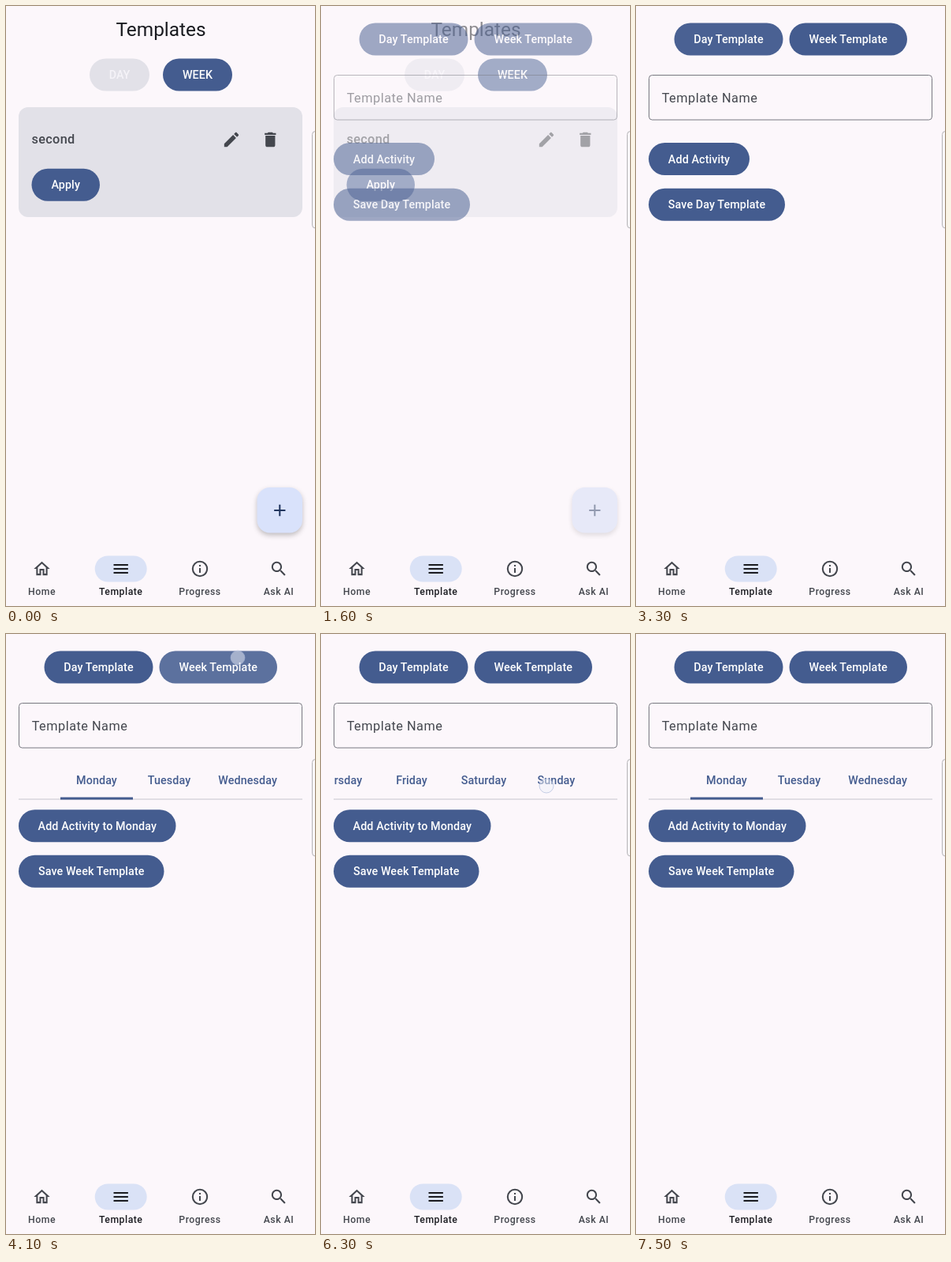
Write an HTML page that moves like this. It is 392 px wide and 759 px high and loops after 8000 ms.

```html
<!DOCTYPE html>
<html lang="en">
<head>
<meta charset="utf-8">
<title>Templates</title>
<style>
  html, body { margin: 0; width: 100%; height: 100%; overflow: hidden; background: #fcf7fb; }
  svg { display: block; width: 100%; height: 100%; }
  text { font: 500 14.3px Roboto, sans-serif; letter-spacing: .1px; }
  .mid { text-anchor: middle; }
  .title { font-size: 24.4px; font-weight: 400; letter-spacing: 0; fill: #1a1b20; }
  .label { font-size: 16.3px; font-weight: 400; letter-spacing: .5px; fill: #44474e; }
  .name { font-size: 16.3px; letter-spacing: .3px; fill: #44474e; }
  .nav { font-size: 12.25px; letter-spacing: .5px; }
  .tab { fill: #445c8f; }
  #fab { filter: drop-shadow(0 3px 3px rgba(0, 0, 0, .24)); }
</style>
</head>
<body>
<svg viewBox="0 0 392 759" id="stage"></svg>
<script>
const PRIMARY = '#445c8f', GREY = '#44474e', DARK = '#1a1b20';

const ICONS = {
  edit: 'M3 17.25V21h3.75L17.81 9.94l-3.75-3.75L3 17.25zM20.71 7.04c.39-.39.39-1.02 0-1.41l-2.34-2.34c-.39-.39-1.02-.39-1.41 0l-1.83 1.83 3.75 3.75 1.83-1.83z',
  bin: 'M6 19c0 1.1.9 2 2 2h8c1.1 0 2-.9 2-2V7H6v12zM19 4h-3.5l-1-1h-5l-1 1H5v2h14V4z',
  plus: 'M19 13h-6v6h-2v-6H5v-2h6V5h2v6h6v2z',
  home: 'M12 5.69l5 4.5V18h-2v-6H9v6H7v-7.81l5-4.5M12 3L2 12h3v8h6v-6h2v6h6v-8h3L12 3z',
  menu: 'M3 18h18v-2H3v2zm0-5h18v-2H3v2zm0-7v2h18V6H3z',
  info: 'M11 7h2v2h-2zm0 4h2v6h-2zM12 2a10 10 0 1 0 0 20a10 10 0 1 0 0-20zm0 18a8 8 0 1 1 0-16a8 8 0 1 1 0 16z',
  search: 'M15.5 14h-.79l-.28-.27A6.5 6.5 0 1 0 13.73 14.43l.27.28v.79l5 4.99L20.49 19l-4.99-5zm-6 0a4.5 4.5 0 1 1 0-9a4.5 4.5 0 1 1 0 9z'
};

const rect = (x, y, w, h, r, fill, extra = '') =>
  `<rect x="${x}" y="${y}" width="${w}" height="${h}" rx="${r}" fill="${fill}" ${extra}/>`;
const text = (x, y, s, cls, extra = '') => `<text x="${x}" y="${y}" class="${cls}" ${extra}>${s}</text>`;
const icon = (name, cx, cy, fill) =>
  `<path d="${ICONS[name]}" fill="${fill}" fill-rule="evenodd" transform="translate(${cx} ${cy}) scale(1.02) translate(-12 -12)"/>`;
const button = (x, y, w, s, fill = PRIMARY, ink = '#fff') =>
  rect(x, y, w, 41, 20.5, fill) + text(x + w / 2, y + 25.6, s, 'mid', `fill="${ink}"`);
const ripple = (id, x, y, w, h, r, fill) => rect(x, y, w, h, r, fill, `id="${id}" opacity="0"`);

const listScreen =
  text(196.5, 38, 'Templates', 'title mid') +
  button(106, 66.5, 76, 'DAY', '#e2e1e8', '#f5f3f8') +
  button(199, 66.5, 88, 'WEEK') +
  rect(16, 128, 360, 139, 12, '#e2e1e8') +
  text(32.5, 174, 'second', 'name') +
  icon('edit', 286, 169, GREY) + icon('bin', 335.3, 169, GREY) +
  button(32.5, 205.7, 86.5, 'Apply') +
  rect(318.5, 609, 57.5, 57.5, 16.3, '#d9e2fb', 'id="fab"') +
  ripple('fabRipple', 318.5, 609, 57.5, 57.5, 16.3, '#22365f') +
  icon('plus', 347.3, 638, '#22365f');

const tabs = [['Monday', 115], ['Tuesday', 207], ['Wednesday', 306.7], ['Thursday', 407],
  ['Friday', 500], ['Saturday', 591.5], ['Sunday', 683.5]];

const editScreen =
  button(48.5, 21.5, 138, 'Day Template') + button(194.5, 21.5, 149.5, 'Week Template') +
  ripple('dayRipple', 48.5, 21.5, 138, 41, 20.5, '#fff') +
  ripple('weekRipple', 194.5, 21.5, 149.5, 41, 20.5, '#fff') +
  rect(16.5, 87.5, 359, 56.5, 4, 'none', 'stroke="#777980"') +
  text(32.7, 121.5, 'Template Name', 'label') +
  '<g id="dayForm">' + button(16, 173, 128, 'Add Activity') +
  button(16, 230.7, 173, 'Save Day Template') + '</g>' +
  '<g id="weekForm">' + rect(16, 208.5, 360, 1, 0, '#c6c6ce') +
  '<g clip-path="url(#tabClip)"><g id="tabs">' +
  tabs.map(([s, x]) => text(x, 190.3, s, 'tab mid')).join('') +
  rect(69, 206.5, 92, 3, 0, PRIMARY) + '</g></g>' +
  button(16, 222.2, 199.5, 'Add Activity to Monday') +
  button(16, 279.7, 184.5, 'Save Week Template') + '</g>';

const navItem = (s, name, x, on) =>
  (on ? rect(x - 33, 695.5, 66, 33, 16.5, '#dae2f6') : '') +
  icon(name, x, 712, on ? DARK : GREY) +
  text(x, 744.7, s, 'nav mid', `fill="${on ? DARK : GREY}"`);

const $ = id => document.getElementById(id);
$('stage').innerHTML =
  '<clipPath id="tabClip"><rect x="16" y="160" width="360" height="52"/></clipPath>' +
  `<g id="list">${listScreen}</g><g id="edit">${editScreen}</g>` +
  rect(388.5, 158.5, 20, 122.5, 4, '#faf7fa', 'stroke="#b4b3b6"') +
  navItem('Home', 'home', 45.5) + navItem('Template', 'menu', 145.7, true) +
  navItem('Progress', 'info', 246) + navItem('Ask AI', 'search', 346) +
  '<circle id="finger" r="9" fill="#eef2fa" fill-opacity=".5" stroke="#a3b3d6" stroke-opacity=".6"/>';

const clamp = v => Math.min(1, Math.max(0, v));
const span = (t, a, b) => clamp((t - a) / (b - a));
const mix = (a, b, k) => a + (b - a) * k;

// cubic-bezier(.4, 0, .2, 1), solved by bisection
function ease(x) {
  let lo = 0, hi = 1;
  for (let i = 0; i < 20; i++) {
    const s = (lo + hi) / 2;
    if (1.2 * s * (1 - s) ** 2 + .6 * s * s * (1 - s) + s ** 3 < x) lo = s; else hi = s;
  }
  return 3 * lo * lo * (1 - lo) + lo ** 3;
}
const fling = k => 1 - (1 - k) ** 2.3;

// down, move start, up (ms), then start and end points
const touches = [
  [1300, 1300, 1400, 347, 638, 347, 638],
  [2800, 2800, 3000, 130, 33, 130, 33],
  [4000, 4000, 4200, 294, 30, 294, 30],
  [4700, 4800, 5200, 293, 188, 128, 150],
  [6300, 6300, 6500, 286, 192, 200, 188],
  [6600, 6600, 6900, 110, 190, 280, 200]
];

function scrollAt(t) {
  if (t < 5200) return 165 * span(t, 4800, 5200);
  if (t < 6300) return mix(165, 385, fling(span(t, 5200, 6000)));
  if (t < 6600) return mix(385, 406, span(t, 6300, 6400));
  if (t < 6900) return mix(406, 236, span(t, 6600, 6900));
  return 236 * (1 - fling(span(t, 6900, 7500)));
}

const press = (t, down, up, end) => .13 * span(t, down - 50, down + 50) * (1 - span(t, up, end));
const fade = (id, v) => $(id).setAttribute('opacity', v);

function draw(t) {
  const k = ease(span(t, 1350, 2050));
  fade('list', 1 - k);
  fade('edit', k);
  fade('fabRipple', press(t, 1300, 1400, 1700));
  fade('dayRipple', press(t, 2800, 3000, 3400));
  fade('weekRipple', press(t, 4000, 4100, 4400));
  fade('dayForm', +(t < 4100));
  fade('weekForm', +(t >= 4100));
  $('tabs').setAttribute('transform', `translate(${-scrollAt(t)} 0)`);

  const touch = touches.find(([down, , up]) => t >= down && t < up);
  fade('finger', touch ? 1 : 0);
  if (touch) {
    const [, move, up, x0, y0, x1, y1] = touch, p = span(t, move, up);
    $('finger').setAttribute('cx', mix(x0, x1, p));
    $('finger').setAttribute('cy', mix(y0, y1, p));
  }
}

function tick() {
  draw(Math.floor(performance.now() % 8000 / 100) * 100);
  requestAnimationFrame(tick);
}
tick();
</script>
</body>
</html>
```
